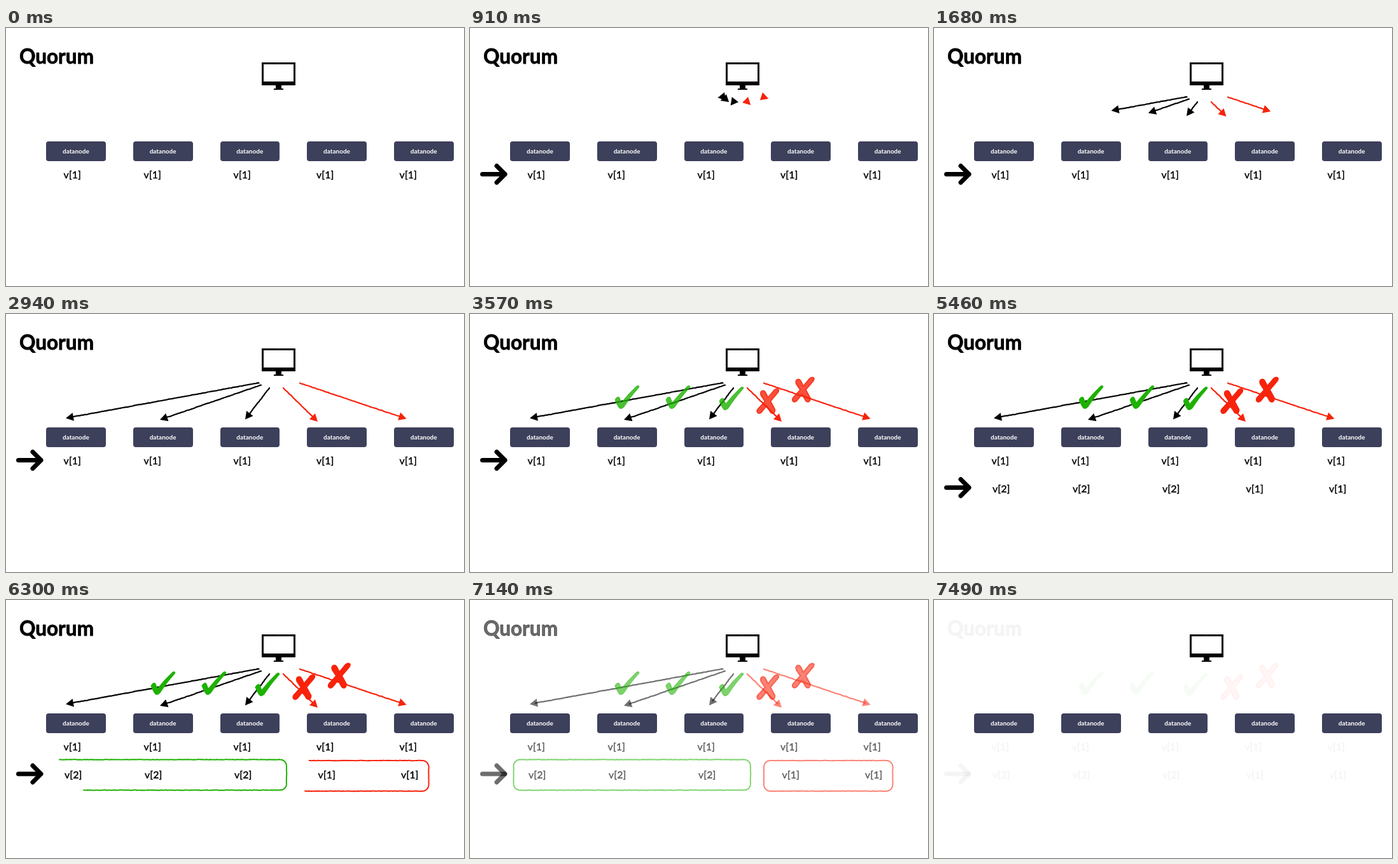
An HTML page with a canvas for the animation above (9.03 s loop, 720x405 px).

```html
<!DOCTYPE html>
<html lang="en">
<head>
<meta charset="utf-8">
<title>Quorum write</title>
<style>
  html, body { margin: 0; width: 100%; height: 100%; overflow: hidden; background: #fff; }
  canvas { display: block; width: 100%; height: 100%; }
</style>
</head>
<body>
<canvas id="stage" width="720" height="405"></canvas>
<script>
const ctx = document.getElementById('stage').getContext('2d');
const LOOP = 9030, STEP = 70;
const BLACK = '#000', RED = '#f7230c', GREEN = '#1db100', NODE = '#3d405b';

const clamp = v => Math.max(0, Math.min(1, v));
const span = (t, start, length) => clamp((t - start) / length);
const ease = u => (1 - Math.cos(Math.PI * u)) / 2;

function backOut(u) {
  const s = 2.1, v = u - 1;
  return 1 + (s + 1) * v ** 3 + s * v * v;
}

let seed = 7;
function random() {
  seed = (seed * 16807) % 2147483647;
  return seed / 2147483647;
}
const jitter = () => (random() - 0.5) * 0.6;

// Text with a thin stroke to thicken the strokes of the letters
function text(str, x, y, { size, weight = 700, bold = 0, color = BLACK, align = 'left' }) {
  ctx.font = `${weight} ${size}px Lato, "Open Sans", sans-serif`;
  ctx.textAlign = align;
  ctx.fillStyle = ctx.strokeStyle = color;
  ctx.fillText(str, x, y);
  if (!bold) return;
  ctx.lineWidth = bold;
  ctx.lineJoin = 'round';
  ctx.strokeText(str, x, y);
}

const TITLE = { size: 31.5, bold: 0.8 };
const VALUE = { size: 16, weight: 400, bold: 0.4 };
const LABEL = { size: 10, color: '#fff', align: 'center' };

function polyline(points, color, width) {
  ctx.beginPath();
  points.forEach(([x, y]) => ctx.lineTo(x, y));
  ctx.strokeStyle = color;
  ctx.lineWidth = width;
  ctx.lineCap = ctx.lineJoin = 'round';
  ctx.stroke();
}

function polygon(points, color) {
  ctx.beginPath();
  points.forEach(([x, y]) => ctx.lineTo(x, y));
  ctx.closePath();
  ctx.fillStyle = color;
  ctx.fill();
}

// Chalk arrows
function makeArrow(x, y, tipX, tipY, color) {
  const length = Math.hypot(tipX - x, tipY - y);
  const rough = Array.from({ length: Math.ceil(length / 2) }, jitter);
  return { x, y, length, color, rough, angle: Math.atan2(tipY - y, tipX - x) };
}

const arrows = [
  makeArrow(397.5, 108, 94, 163.5, BLACK),
  makeArrow(401, 111.5, 242, 166, BLACK),
  makeArrow(414, 116, 376, 165.5, BLACK),
  makeArrow(436, 116, 490, 169, RED),
  makeArrow(462, 108.5, 629.5, 164.5, RED)
];

function drawArrow(a, p) {
  const tip = 7 + (a.length - 7) * p;
  const shaft = Math.max(0, tip - 9);
  const points = a.rough.map((dy, i) => [i * 2, dy]).filter(q => q[0] < shaft);
  points.push([shaft, 0]);
  ctx.save();
  ctx.translate(a.x, a.y);
  ctx.rotate(a.angle);
  polyline(points, a.color, 2.2);
  polygon([[tip, 0], [tip - 12, -6.5], [tip - 12, 6.5]], a.color);
  ctx.restore();
}

// Rounded outlines, drawn clockwise from a point on the top edge
function makeOutline(left, top, right, bottom, startX, color) {
  const r = 10, points = [];
  const line = (x0, y0, x1, y1) => {
    const n = Math.ceil(Math.hypot(x1 - x0, y1 - y0) / 2);
    for (let i = 0; i < n; i++) {
      points.push([x0 + (x1 - x0) * i / n + jitter(), y0 + (y1 - y0) * i / n + jitter()]);
    }
  };
  const corner = (x, y, from) => {
    for (let i = 0; i < 8; i++) {
      const a = (from + i / 8) * Math.PI / 2;
      points.push([x + r * Math.cos(a), y + r * Math.sin(a)]);
    }
  };
  line(startX, top, right - r, top);
  corner(right - r, top + r, -1);
  line(right, top + r, right, bottom - r);
  corner(right - r, bottom - r, 0);
  line(right - r, bottom, left + r, bottom);
  corner(left + r, bottom - r, 1);
  line(left, bottom - r, left, top + r);
  corner(left + r, top + r, 2);
  line(left + r, top, startX, top);
  points.push([startX, top]);
  return { points, color };
}

const outlines = [
  makeOutline(68.5, 250.5, 441, 298.5, 84, GREEN),
  makeOutline(462, 252, 664.5, 300, 476.5, RED)
];

function drawOutline(o, p) {
  polyline(o.points.slice(0, Math.max(2, Math.round(o.points.length * p))), o.color, 2);
}

// Ticks and crosses
const tick = new Path2D(`M0 23 Q1 19 5 18 Q7 18 8 22 L10 27
  Q21 13 34 1 L37 .5 Q39 2 37 4 Q25 17 14 34 Q10 38 7 36 Q4 33 0 23Z`);
const cross = new Path2D(`M28 2 Q33 -1 35 2 Q35 5 33 7 L22 20 L29 33
  Q29 38 26 39 Q22 39 21 36 L16 27 L8 37 Q3 41 1 37 Q0 34 3 31
  L13 20 L7 11 Q5 6 8 4 Q12 2 14 6 L18 14Z`);

function stamp(shape, x, y, color, bold) {
  ctx.save();
  ctx.translate(x, y);
  ctx.fillStyle = ctx.strokeStyle = color;
  ctx.lineWidth = bold;
  ctx.fill(shape);
  ctx.stroke(shape);
  ctx.restore();
}

function drawMarks() {
  for (const [x, y] of [[228, 112], [308, 112], [392, 114]]) stamp(tick, x, y, GREEN, 0.8);
  for (const [x, y] of [[450.5, 117], [506, 99]]) stamp(cross, x, y, RED, 1.8);
}

function drawPointer(y, scale) {
  ctx.save();
  ctx.translate(37.5, y);
  ctx.scale(scale, scale);
  polyline([[-18, 0], [17, 0]], BLACK, 7);
  polyline([[4.5, -13], [17.5, 0], [4.5, 13]], BLACK, 7);
  ctx.restore();
}

function drawMonitor() {
  ctx.fillStyle = BLACK;
  ctx.fillRect(402, 54, 53, 36);
  ctx.fillRect(424, 90, 9, 5);
  ctx.fillRect(421, 95, 15, 2);
  ctx.fillStyle = '#fff';
  ctx.fillRect(405, 57, 47, 27);
  ctx.fillStyle = '#999';
  ctx.fillRect(428, 55, 1, 1);
}

function drawNodes() {
  for (let i = 0; i < 5; i++) {
    const x = 63.2 + 136.7 * i, left = Math.round(x);
    ctx.fillStyle = NODE;
    ctx.beginPath();
    ctx.roundRect(left, 178, Math.round(x + 93.7) - left, 31, 4);
    ctx.fill();
    text('datanode', x + 46.7, 197, LABEL);
  }
}

const columns = [90.5, 216.5, 357.5, 488, 618.5];

function render(t) {
  const out = span(t, 6860, 630);
  const keep = 1 - out * 0.96;

  ctx.globalAlpha = 1;
  ctx.fillStyle = '#fff';
  ctx.fillRect(0, 0, 720, 405);
  drawMonitor();
  drawNodes();

  ctx.globalAlpha = keep;
  text('Quorum', 21, 56, TITLE);
  columns.forEach(x => text('v[1]', x, 236, VALUE));

  const pop = span(t, 70, 700);
  if (pop > 0) drawPointer(229.5 + 43.5 * ease(span(t, 4480, 1050)), Math.max(0, backOut(pop)));

  ctx.globalAlpha = 1 - out;
  const grow = ease(span(t, 825, 2030));
  if (grow > 0) arrows.forEach(a => drawArrow(a, grow));
  const ring = ease(span(t, 5525, 1015));
  if (ring > 0) outlines.forEach(o => drawOutline(o, ring));

  ctx.globalAlpha = keep * span(t, 3010, 700);
  drawMarks();

  ctx.globalAlpha = keep * span(t, 3780, 700);
  columns.forEach((x, i) => text(i < 3 ? 'v[2]' : 'v[1]', x + (i < 3 ? 1.5 : 2.5), 279.5, VALUE));
}

const begin = performance.now();
function loop() {
  const t = (performance.now() - begin) % LOOP;
  render(Math.floor(t / STEP) * STEP);
  requestAnimationFrame(loop);
}
loop();
</script>
</body>
</html>
```
